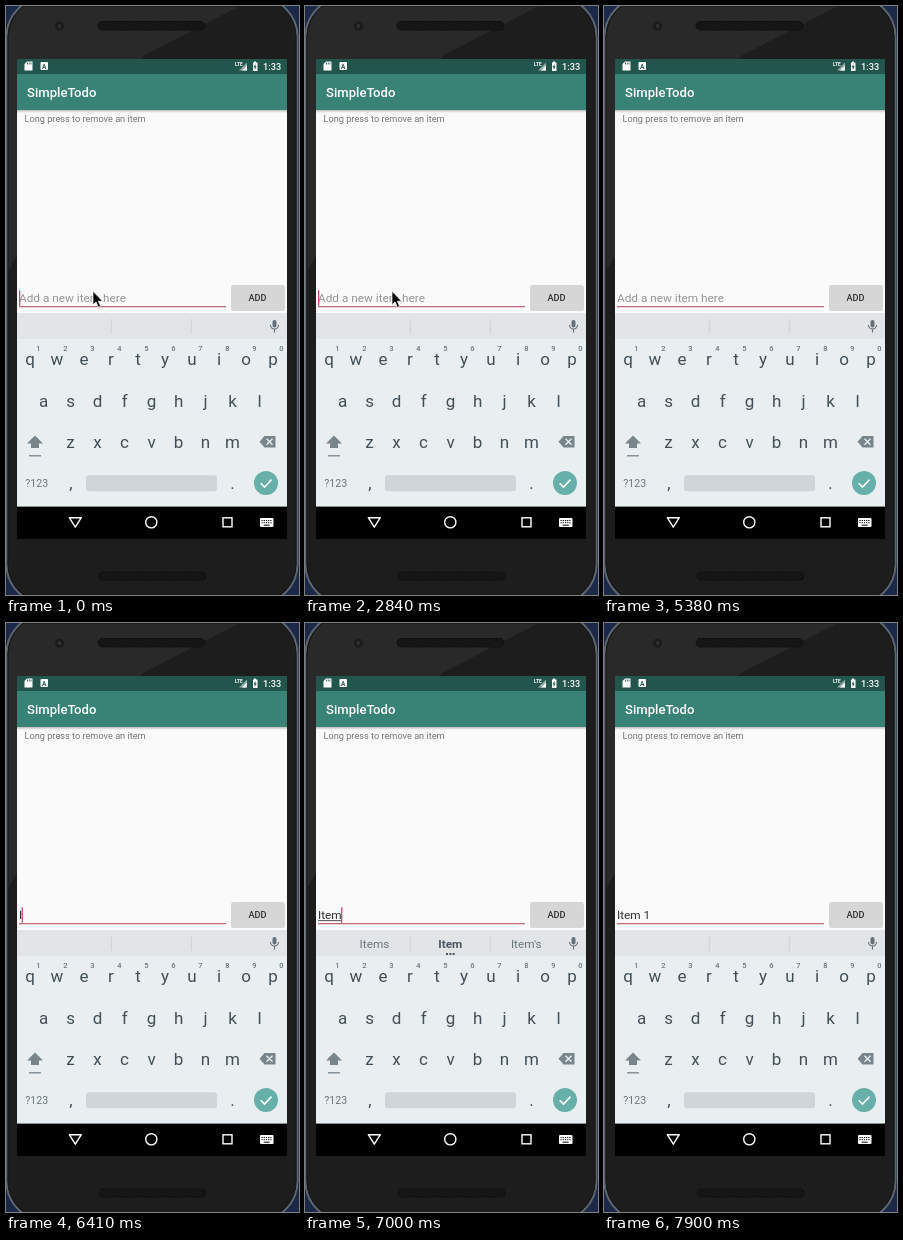
An HTML page that plays this animation: 293x589 px, repeating every 8000 ms.

```html
<!DOCTYPE html>
<html lang="en">
<head>
<meta charset="utf-8">
<title>SimpleTodo</title>
<style>
html, body { margin: 0; width: 100%; height: 100%; overflow: hidden; background: #1b2848; }
svg { display: block; width: 293px; height: 589px; }
text { font-family: Roboto, sans-serif; white-space: pre; }
.mid { text-anchor: middle; }
.bold { font-weight: 500; }
.key { font-size: 17px; fill: #414f56; }
.digit { font-size: 7.5px; fill: #6b777d; font-weight: 500; }
.field { font-size: 11.8px; }
.word { font-size: 11.8px; fill: #6b777d; }
</style>
</head>
<body>
<svg viewBox="0 0 293 589">
  <defs>
    <linearGradient id="shade" x2="0" y2="1">
      <stop stop-color="#000" stop-opacity=".25"/><stop offset="1" stop-color="#000" stop-opacity="0"/>
    </linearGradient>
    <pattern id="mesh" width="3" height="3" patternUnits="userSpaceOnUse">
      <rect width="3" height="3" fill="#101010"/><path d="M0 3L3 0" stroke="#242424" stroke-width=".8"/>
    </pattern>
  </defs>

  <!-- phone -->
  <rect x=".5" y="-9" width="291" height="607" rx="40" fill="#1d1d1d" stroke="#5d6670" stroke-width="2"/>
  <path d="M16 1H232L137 50 11 250 2 265V32Q5 10 16 1z" fill="#292929"/>
  <rect x="2" y="-7.5" width="288" height="604" rx="38.5" fill="none" stroke="#161616"/>
  <rect x="92" y="15.5" width="107" height="8.5" rx="4.2" fill="url(#mesh)" stroke="#101010"/>
  <rect x="93" y="566" width="107" height="8" rx="4" fill="url(#mesh)" stroke="#101010"/>
  <circle cx="53.5" cy="20" r="4.5" fill="#1b1b1b"/><circle cx="53.5" cy="20" r="2" fill="#303138"/>

  <!-- app -->
  <rect x="11" y="53" width="270" height="480" fill="#fafafa"/>
  <rect x="11" y="53" width="270" height="15" fill="#22554b"/>
  <rect x="11" y="68" width="270" height="36" fill="#388276"/>
  <rect x="11" y="104" width="270" height="3" fill="url(#shade)"/>
  <g fill="#fff">
    <path d="M21 55.5h5.5v9H18.5v-6.5z"/>
    <path d="M21.5 56.5v2M23.3 56.5v2M25 56.5v2" stroke="#22554b" stroke-width=".8"/>
    <rect x="34.5" y="56" width="7.5" height="8" rx="1"/>
    <path d="M236 64.5l5-5v5z"/><path d="M233 64.5l8-8v8z" opacity=".5"/>
    <path d="M247 56.5h1v-1h2v1h1.5v8.5H247v-8.5z"/>
    <path d="M249.5 58l-2 3.2h1.2v2.6l2-3.4h-1.2z" fill="#22554b"/>
    <text x="229" y="60" font-size="4.8" font-weight="700">LTE</text>
    <text x="257" y="64" font-size="9.2" class="bold">1:33</text>
    <text x="21" y="91" font-size="13.1" class="bold">SimpleTodo</text>
  </g>
  <text x="38.2" y="62.5" font-size="6.5" font-weight="700" class="mid" fill="#22554b">A</text>
  <text x="18.5" y="116" font-size="9.2" fill="#757575">Long press to remove an item</text>

  <!-- input row -->
  <text id="hint" class="field" x="13" y="296" fill="#959595">Add a new item here</text>
  <text id="typed" class="field" x="13" y="296" fill="#303030"></text>
  <path id="under" d="M13 297.6h23.5" stroke="#444" stroke-width=".9"/>
  <rect x="13" y="300" width="207" height="1.3" fill="#bf6f7c"/>
  <rect id="caret" y="284.3" width="1.3" height="15.4" fill="#cf4a70"/>
  <rect x="225" y="280" width="54" height="25" rx="2" fill="#000" opacity=".14"/>
  <rect x="225.5" y="279" width="53" height="24.6" rx="1.5" fill="#d6d6d6"/>
  <text x="251.5" y="294.7" font-size="9.2" class="mid bold" fill="#303030">ADD</text>

  <!-- keyboard -->
  <rect x="11" y="307" width="270" height="194" fill="#e9eef1"/>
  <rect x="11" y="307" width="270" height="26" fill="#e1e5e8"/>
  <path d="M105.3 313v15M185.3 313v15" stroke="#ccd2d6"/>
  <g id="words">
    <text class="word mid" x="69.5" y="325"></text>
    <text class="word mid" x="145.3" y="325" style="font-weight:700;fill:#4a575e"></text>
    <text class="word mid" x="221.3" y="325"></text>
    <path d="M141 331h2M144.3 331h2M147.6 331h2" stroke="#4a575e" stroke-width="1.8"/>
  </g>
  <rect x="266.5" y="314" width="4" height="7.5" rx="2" fill="#647178"/>
  <path d="M264.5 319a4 4 0 0 0 8 0M268.5 323v3.5" fill="none" stroke="#647178" stroke-width="1.1"/>
  <g id="keys"></g>
  <path d="M29 429.5l8 8h-4v4.5h-8v-4.5h-4z" fill="#78858b"/>
  <path d="M23 449.8h12" stroke="#78858b" stroke-width="1.3"/>
  <path d="M258.5 430h11v11.5h-11l-5-5.7z" fill="#78858b"/>
  <path d="M260.5 432.7l6 6m0-6l-6 6" stroke="#e9eef1" stroke-width="1.4"/>
  <text x="30.7" y="480.6" font-size="10.6" class="mid" fill="#6b777d">?123</text>
  <rect x="80" y="469.3" width="131" height="16" rx="3" fill="#cfd5d8"/>
  <circle cx="260" cy="477" r="12" fill="#66b0a9"/>
  <path d="M254.7 477.2l3.8 3.8 7-7.4" fill="none" stroke="#fff" stroke-width="1.6"/>

  <!-- navigation -->
  <rect x="11" y="500.6" width="270" height="32.4" fill="#000"/>
  <g fill="none" stroke="#fff" stroke-width="1.4">
    <path d="M63.3 511.7h12l-6 9.5z" stroke-linejoin="round"/>
    <circle cx="145.3" cy="516.3" r="5.6"/>
    <rect x="217" y="511.8" width="9" height="9"/>
  </g>
  <rect x="254" y="512" width="13.5" height="9" rx="1" fill="#fff"/>
  <path d="M255.5 514.5h10.5M255.5 516.7h10.5" stroke="#000" stroke-dasharray="1.2 1"/>
  <path d="M257.7 519.2h6" stroke="#000"/>

  <path id="mouse" d="M0 0V13.5l3.1-2.8 2.3 5.3 2.2-1-2.3-5.1H9.6z" fill="#000" stroke="#fff" stroke-width=".7"/>
</svg>
<script>
const $ = id => document.getElementById(id);
const show = (el, on) => el.style.display = on ? '' : 'none';

function addKey(cls, x, y, label) {
  const el = document.createElementNS('http://www.w3.org/2000/svg', 'text');
  el.setAttribute('class', cls + ' mid');
  el.setAttribute('x', x);
  el.setAttribute('y', y);
  el.textContent = label;
  $('keys').append(el);
}
[['qwertyuiop', 24, 359], ['asdfghjkl', 37.6, 400.5], ['zxcvbnm', 64.5, 442]].forEach(([row, x, y]) =>
  [...row].forEach((c, i) => addKey('key', x + 27 * i, y, c)));
[...'1234567890'].forEach((c, i) => addKey('digit', 32.3 + 27 * i, 344.7, c));
addKey('key', 65, 482.7, ',');
addKey('key', 226.5, 482.7, '.');

const LOOP = 8000;
const blinks = [450, 900, 1340, 1940, 2390, 2840, 3440, 3890, 4340, 4930, 5380, 5820, 6260, 6410, 7900];
// start time, typed text, suggestions
const steps = [
  [0, '', ''],
  [6410, 'I', ''],
  [6560, 'It', "I'm I In"],
  [6700, 'Ite', "It's It Is"],
  [6850, 'Item', 'Item Ite Its'],
  [7000, 'Item', "Items Item Item's"],
  [7150, 'Item ', "Items Item Item's"],
  [7300, 'Item 1', '']
];
const typed = $('typed'), slots = $('words').querySelectorAll('text');

function draw(t) {
  const [, text, words] = steps.findLast(s => s[0] <= t);
  typed.textContent = text;
  show($('hint'), !text);
  show($('under'), t >= 7000 && t < 7150);
  show($('words'), words);
  words.split(' ').forEach((w, i) => slots[i].textContent = w);

  show($('caret'), blinks.filter(b => b <= t).length % 2 === 0);
  const end = text ? typed.getComputedTextLength() : 0;
  $('caret').setAttribute('x', 13 + Math.max(0, end - .6));

  show($('mouse'), t < 5080);
  $('mouse').setAttribute('transform', t < 4930 ? 'translate(87 285.3)' : 'translate(110.5 401)');
}

const start = performance.now();
function tick() {
  draw((performance.now() - start) % LOOP);
  requestAnimationFrame(tick);
}
tick();
</script>
</body>
</html>
```
